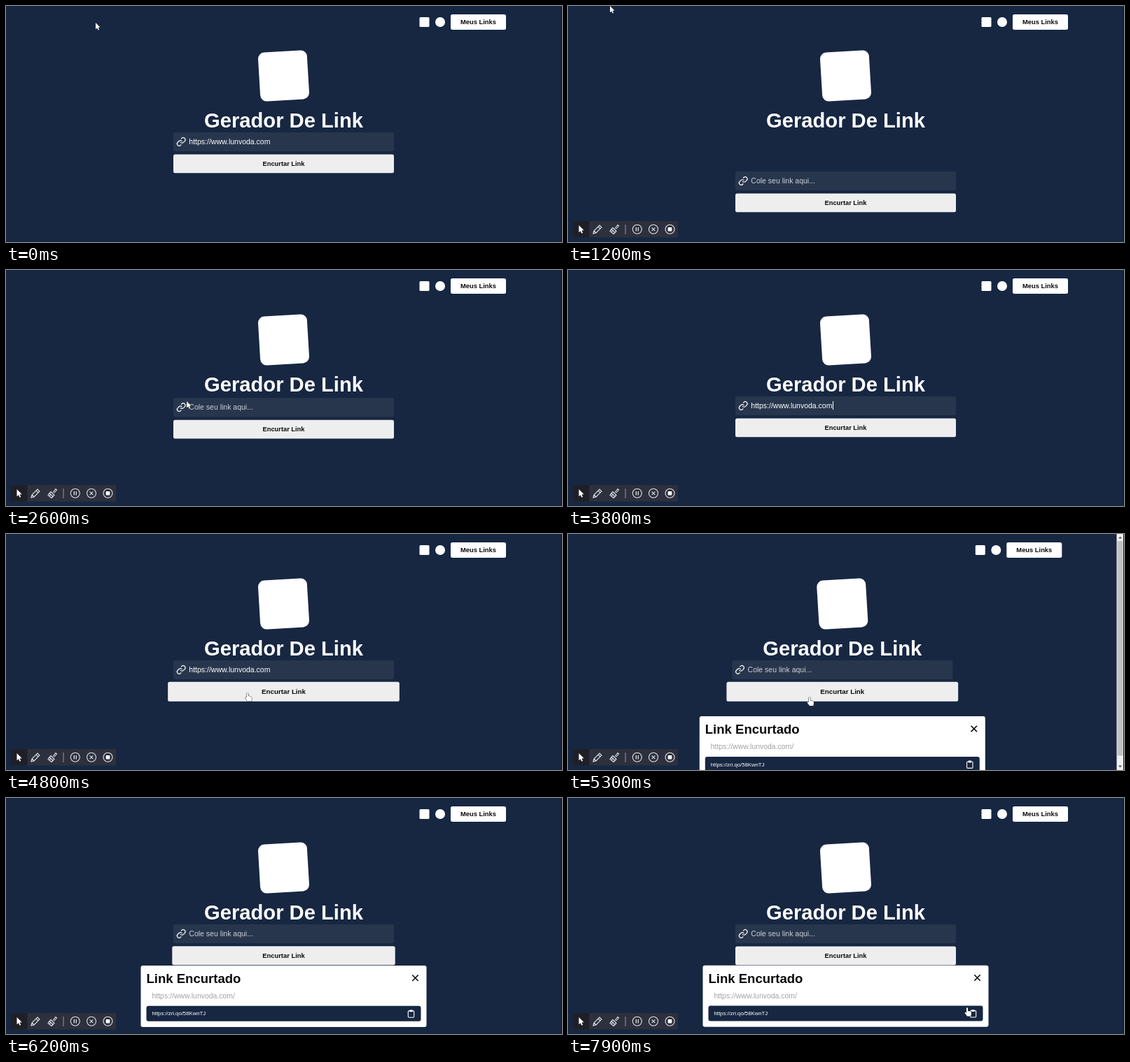
These frames come from a looping animation (794x338 px, 8000 ms). An HTML page with a canvas:

```html
<!DOCTYPE html>
<html lang="pt-BR">
<head>
<meta charset="utf-8">
<title>Gerador De Link</title>
<style>
  html, body { margin: 0; width: 100%; height: 100%; overflow: hidden; background: #172742; }
  canvas { display: block; width: 794px; height: 338px; }
</style>
</head>
<body>
<canvas id="stage" width="794" height="338"></canvas>
<script>
const ctx = document.getElementById('stage').getContext('2d');
const W = 794, H = 338, LOOP = 8000, STEP = 100;
const NAVY = '#172742', WHITE = '#fff', INK = '#0a0a0a';
const SITE = 'https://www.lunvoda.com', SHORT = 'https://zri.qo/58KwnTJ';

const chain = new Path2D('M10 13a5 5 0 0 0 7.54.54l3-3a5 5 0 0 0-7.07-7.07l-1.72 1.71' +
  'M14 11a5 5 0 0 0-7.54-.54l-3 3a5 5 0 0 0 7.07 7.07l1.71-1.71');
const arrow = new Path2D('M0 0V9.2L2.1 7.3L3.6 10.6L5.1 9.9L3.6 6.8L6.4 6.5Z');
const hand = new Path2D('M-1 7V1q1-2 2 0v4l3 .6q2 .4 2 2.4l-.6 4.5H0l-3.4-4.5q0-1.4 2.4-1z');
const pencil = new Path2D('M-6 6L-5 2L3-6L6-3L-2 5ZM1-4L4-1M-5 2L-2 5');
const brush = new Path2D('M1-1L5-6L6.5-4.5L2.5 0M-2-2L3 3L1 5L-4 0ZM-4 0L-6 3L-1 7L1 5M-4 4L-2.5 2.5');

// Pointer waypoints: time, x, y, shape held until the next waypoint
const pointerPath = [
  [0, 128, 24, 'arrow'], [100, 84, 9, 'arrow'], [200, 60, 0, 'arrow'],
  [1600, 60, 0, 'arrow'], [2000, 190, 132, 'arrow'], [2500, 258, 188, 'arrow'],
  [2700, 258, 188, 'arrow'], [2800, 260, 194, 'beam'], [3400, 260, 194, ''],
  [4000, 358, 196, 'beam'], [4400, 347, 214, 'hand'], [4800, 345, 227, 'hand'],
  [5000, 345, 233.5, 'hand'], [5800, 345, 233.5, 'hand'], [5900, 342, 250, ''],
  [6700, 338, 290, 'beam'], [7300, 267, 310, 'beam'], [7500, 267, 310, 'beam'],
  [7900, 570, 300, 'hand'], [8000, 570, 300, 'hand']
];

const clamp = v => Math.min(1, Math.max(0, v));
const lerp = (a, b, p) => a + (b - a) * p;

// The CSS "ease" curve: cubic-bezier(.25, .1, .25, 1)
function ease(x) {
  if (x <= 0 || x >= 1) return clamp(x);
  const bez = (a, b, u) => 3 * a * u * (1 - u) ** 2 + 3 * b * u * u * (1 - u) + u ** 3;
  let lo = 0, hi = 1;
  for (let i = 0; i < 24; i++) {
    const mid = (lo + hi) / 2;
    if (bez(.25, .25, mid) < x) lo = mid; else hi = mid;
  }
  return bez(.1, 1, lo);
}
const eased = (t, start, length) => ease((t - start) / length);

function box(x, y, w, h, r, fill) {
  ctx.beginPath();
  ctx.roundRect(x, y, w, h, r);
  ctx.fillStyle = fill;
  ctx.fill();
}

function text(str, x, y, size, fill, bold, align = 'left') {
  ctx.font = `${bold ? 'bold ' : ''}${size}px "Liberation Sans", Arial, sans-serif`;
  ctx.textAlign = align;
  ctx.fillStyle = fill;
  ctx.fillText(str, x, y);
}

function line(color, width, ...points) {
  ctx.strokeStyle = color;
  ctx.lineWidth = width;
  ctx.beginPath();
  for (let i = 0; i < points.length; i += 4) {
    ctx.moveTo(points[i], points[i + 1]);
    ctx.lineTo(points[i + 2], points[i + 3]);
  }
  ctx.stroke();
}

function at(x, y, scale, draw) {
  ctx.save();
  ctx.translate(x, y);
  ctx.scale(scale, scale);
  draw();
  ctx.restore();
}

function disc(x, y, r, stroke) {
  ctx.beginPath();
  ctx.arc(x, y, r, 0, 7);
  if (stroke) { ctx.lineWidth = 1.1; ctx.strokeStyle = stroke; ctx.stroke(); }
  else { ctx.fillStyle = WHITE; ctx.fill(); }
}

function header() {
  box(590.5, 16, 14, 14, 1.5, WHITE);
  disc(620, 23, 7);
  box(635, 12, 79, 22, 2.5, WHITE);
  text('Meus Links', 674.5, 26, 9.35, INK, true, 'center');
}

function hero() {
  at(396.5, 100, 1, () => {
    ctx.rotate(-.06);
    box(-35, -35, 70, 70, 9, WHITE);
  });
  text('Gerador De Link', 396.5, 174.3, 29.2, WHITE, true, 'center');
}

function form(t) {
  const filled = t < 1200 || (t >= 3800 && t < 4900);
  const drop = t < 1200 ? 0 : 58 * (1 - eased(t, 1100, 2000));
  ctx.save();
  ctx.translate(0, drop);
  box(239, 181, 315, 27, 2.5, '#28364d');
  at(243.2, 187.4, 14 / 24, () => {
    ctx.strokeStyle = WHITE;
    ctx.lineWidth = 2;
    ctx.stroke(chain);
  });
  text(filled ? SITE : 'Cole seu link aqui...', 261.3, 197.8, 10.5, filled ? WHITE : '#cbcfd6');
  if (t >= 2900 && t < 3400) line(WHITE, 1, 261.5, 188, 261.5, 200);
  if (t >= 3800 && t < 4300) line(WHITE, 1, 378.5, 188, 378.5, 200);

  const grow = 1 + .05 * (eased(t, 4350, 500) - eased(t, 5960, 500));
  at(396.5, 225.8, grow, () => {
    box(-157.5, -13.4, 315, 26.8, 2.5, '#efeeef');
    text('Encurtar Link', 0, 3.1, 9.3, INK, true, 'center');
  });
  ctx.restore();
}

function modal(rise) {
  ctx.save();
  ctx.translate(0, rise);
  box(192.5, 239.7, 408, 88, 3, WHITE);
  text('Link Encurtado', 200.5, 264.8, 18.55, INK, true);
  line(INK, 1.6, 580.3, 253.3, 588.7, 261.7, 588.7, 253.3, 580.3, 261.7);
  text(SITE + '/', 208.5, 286.6, 10.45, '#a2a2a2');
  box(200.5, 297.5, 392, 22, 3, NAVY);
  text(SHORT, 208.5, 311.2, 7.75, WHITE);
  ctx.beginPath();
  ctx.roundRect(574.3, 304.6, 8.4, 9.4, 1.2);
  ctx.strokeStyle = WHITE;
  ctx.lineWidth = 1.1;
  ctx.stroke();
  box(576.3, 303.2, 4.4, 2.8, .8, WHITE);
  ctx.restore();
}

function triangle(x, y, dir) {
  ctx.beginPath();
  ctx.moveTo(x - 2.5, y + dir * 1.5);
  ctx.lineTo(x + 2.5, y + dir * 1.5);
  ctx.lineTo(x, y - dir * 1.5);
  ctx.fillStyle = '#555';
  ctx.fill();
}

function scrollbar(overflow) {
  box(783.5, 0, 10, H, 0, '#f1f1f1');
  box(784.5, 10, 8, 318 * H / (H + overflow), 0, '#c1c1c1');
  triangle(788.5, 5, 1);
  triangle(788.5, 333, -1);
}

function toolbar() {
  const c = '#e4e6ea';
  box(7, 308, 150, 23.5, 1, '#2d303d');
  box(7, 308, 23.5, 23.5, 1, '#1f2027');
  at(15.5, 314, 1.12, () => { ctx.fillStyle = WHITE; ctx.fill(arrow); });
  ctx.strokeStyle = c;
  ctx.lineWidth = 1.1;
  at(42, 320, 1, () => ctx.stroke(pencil));
  at(66, 319.5, 1, () => ctx.stroke(brush));
  line('#9699a2', 1, 82, 313, 82, 327);
  for (const x of [98.8, 122, 145.5]) disc(x, 319.8, 6.5, c);
  line(c, 1.3, 97.3, 317, 97.3, 322.6, 100.3, 317, 100.3, 322.6);
  line(c, 1.1, 119.6, 317.4, 124.4, 322.2, 124.4, 317.4, 119.6, 322.2);
  box(142.7, 317, 5.6, 5.6, .5, WHITE);
}

function pointer(t) {
  const next = pointerPath.findIndex(p => p[0] > t);
  const a = pointerPath[next - 1], b = pointerPath[next];
  const p = (t - a[0]) / (b[0] - a[0]);
  const shape = a[3];
  if (!shape) return;
  at(lerp(a[1], b[1], p), lerp(a[2], b[2], p), 1, () => {
    if (shape === 'beam') {
      ctx.globalCompositeOperation = 'difference';
      line('#ccc', 1, 0, -5.5, 0, 5.5, -2.5, -5.5, 2.5, -5.5, -2.5, 5.5, 2.5, 5.5);
      return;
    }
    const path = shape === 'hand' ? hand : arrow;
    ctx.strokeStyle = '#20242c';
    ctx.lineWidth = 1;
    ctx.stroke(path);
    ctx.fillStyle = WHITE;
    ctx.fill(path);
  });
}

function draw(t) {
  box(0, 0, W, H, 0, NAVY);
  const open = t >= 4900;
  const rise = 44 * (1 - eased(t, 4850, 1500));
  const overflow = open ? Math.max(0, rise - 10) : 0;
  const shift = overflow ? -4.7 : 0;

  at(shift * 1.85, 0, 1, header);
  at(shift, 0, 1, () => {
    hero();
    form(t);
    if (open) modal(rise);
  });
  if (overflow) scrollbar(overflow);
  box(793, 0, 1, H, 0, '#0c1422');
  if (t >= 500) {
    ctx.globalAlpha = t < 600 ? .5 : 1;
    toolbar();
    ctx.globalAlpha = 1;
  }
  pointer(t);
}

function tick() {
  const t = performance.now() % LOOP;
  draw(Math.floor(t / STEP) * STEP);
  requestAnimationFrame(tick);
}
tick();
</script>
</body>
</html>
```
